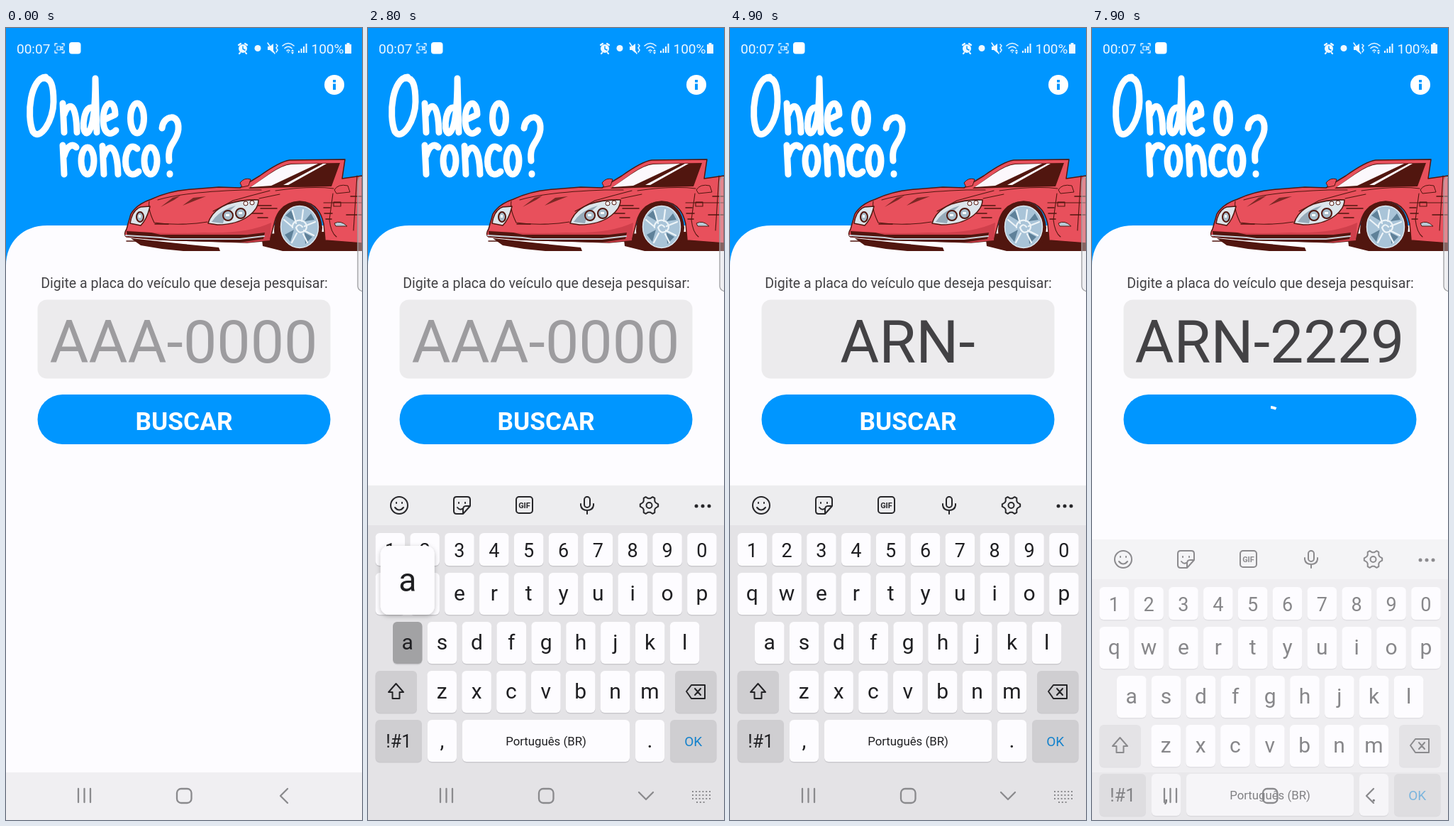
These frames come from a looping animation (502x1115 px, 8 s). An HTML page:

```html
<!DOCTYPE html>
<html lang="pt-BR">
<head>
<meta charset="utf-8">
<title>Busca por placa</title>
<style>
  html, body { margin: 0; width: 100%; height: 100%; overflow: hidden; background: #fdfcff; }
  svg { display: block; width: 100%; height: 100%; font-family: Roboto, sans-serif; }
  .line { fill: none; stroke-linecap: round; stroke-linejoin: round; }
  .mid { text-anchor: middle; }
</style>
</head>
<body>
<svg viewBox="0 0 502 1115">
  <defs>
    <filter id="lift" x="-30%" y="-30%" width="160%" height="160%">
      <feDropShadow dx="0" dy="2" stdDeviation="3" flood-opacity=".25"/>
    </filter>
  </defs>
  <rect width="502" height="1115" fill="#fdfcff"/>
  <path d="M0 0H502V278H58C24 278 0 301 0 335Z" fill="#0096ff"/>

  <g id="status" fill="#eef8ff">
    <text x="15" y="35.5" font-size="19">00:07</text>
    <text x="430.5" y="35.5" font-size="19">100%</text>
    <path class="line" stroke="#eef8ff" stroke-width="1.3" d="M69 25V22H72M79 22H82V25M82 32V35H79M72 35H69V32"/>
    <path id="camera" class="line" stroke="#eef8ff" stroke-width="1.2" d="M72 26H77V31H72ZM77 28L80 26V31L77 29"/>
    <rect x="89" y="20" width="16.5" height="16.5" rx="4" fill="#fff"/>
    <circle cx="334" cy="29" r="6"/>
    <path class="line" stroke="#eef8ff" stroke-width="2.2" d="M328 24L331 22M340 24L337 22M330 35L329 36M338 35L339 36"/>
    <path class="line" stroke="#0096ff" stroke-width="1.4" d="M334 26V29.5L337 31"/>
    <circle cx="355" cy="28.5" r="4.5"/>
    <path d="M369 26H372L377 22V35L372 31H369Z"/>
    <path class="line" stroke="#eef8ff" stroke-width="1.5" d="M369 21L379 36M381 23L383 25L381 28L383 31L381 34"/>
    <path class="line" stroke="#eef8ff" stroke-width="1.6" d="M390 25Q398 18 406 25M393 28.5Q398 24 403 28.5M396 32Q398 30 400 32"/>
    <path d="M397 33H399L398 36ZM404 30L406 33H402ZM402 34H406L404 37Z"/>
    <path d="M412 32h2v3h-2zM415.500 29h2v6h-2zM419 26h2v9h-2zM422.500 22h2v13h-2zM478 23h2.500v-2h4v2h2.500v13h-9z"/>
  </g>

  <g class="line" stroke="#fff" stroke-width="9" role="img" aria-label="Onde o ronco?">
    <path d="M56 69C35 70 28 122 38 146C48 160 67 130 67 104C67 82 64 68 51 71"/>
    <path d="M80 106L82 147M82 122C87 106 99 100 100 147"/>
    <path d="M124 114C111 102 104 147 114 148C122 146 126 116 126 71L128 147"/>
    <path d="M139 129L154 122C154 99 137 101 137 130C138 152 149 151 155 144"/>
    <ellipse cx="185" cy="127" rx="9.5" ry="21"/>
    <path d="M80 165L82 206M82 180C86 166 93 162 99 168"/>
    <ellipse cx="115" cy="187" rx="9" ry="19"/>
    <path d="M136 166L138 206M138 180C144 162 157 162 158 206"/>
    <path d="M185 170C173 159 167 180 169 194C172 210 182 207 187 202"/>
    <ellipse cx="204" cy="187" rx="9" ry="19"/>
    <path d="M220 141C222 122 245 119 243 143C241 162 227 162 230 187M231 205V206"/>
  </g>

  <circle cx="463" cy="80" r="14" fill="#fff"/>
  <path d="M461 73h4v3.500h-4zM461 78.500h4v8.500h-4z" fill="#0096ff"/>

  <g id="car" stroke-linejoin="round">
    <path d="M176 296L250 304L300 309L302 314H250L220 311L190 306ZM360 290L502 285V314H390L362 307Z" fill="#51160f"/>
    <path d="M330 225L358 208Q386 188 400 186L478 185L474 212L502 208V303L450 299L448 276Q442 245 414 244Q386 246 379 272L372 299L340 302L215 298L170 294Q165 291 170 283L176 262Q184 248 205 241Q230 229 262 227L300 224Z" fill="#e8505c" stroke="#51160f" stroke-width="1.5"/>
    <path d="M342 226L366 209Q389 192 402 191L471 190L459 223Q400 224 342 226Z" fill="#51160f"/>
    <path d="M345 224L371 206Q390 193 402 192L440 191L374 222ZM447 191H452L398 221H391Z" fill="#fcf8fc"/>
    <path d="M330 218Q336 210 345 213L342 222L333 224ZM463 228Q468 219 482 222L485 231L466 233Z" fill="#e8505c" stroke="#51160f"/>
    <path d="M170 285Q220 291 280 288Q340 290 374 274L372 299L340 302L215 298L170 294Z" fill="#cf3f4b"/>
    <path d="M170 286L205 288L218 291L340 291L365 288L363 297L330 302L220 299L171 294Z" fill="#51160f"/>
    <path class="line" stroke="#c9d1da" stroke-width="2" d="M169 292L218 295L232 297H330L364 293"/>
    <path class="line" stroke="#51160f" stroke-width="1.1" d="M202 244Q200 256 209 274Q245 279 284 273M214 242Q250 231 334 228L360 228M372 229Q345 236 320 243L292 258M380 229Q430 222 462 226M357 240L386 234M461 233L456 270Q458 288 466 294M495 208L490 285M448 246H502M462 245h10v6h-10z"/>
    <path d="M218 252L235 239L246 236L237 242ZM249 250L264 239L282 237L269 242Z" fill="#7c2825"/>
    <path class="line" stroke="#51160f" stroke-width="1.5" d="M353 250H374M359 254H382M347 261H362M355 267H369M448 253H457M449 261H460M451 269H459M210 276H229M170 300H195M486 237H502M480 263H502"/>
    <path d="M285 275Q290 257 312 248Q333 241 356 242Q356 254 343 264Q326 277 298 277Z" fill="#dce5eb" stroke="#51160f" stroke-width="1.5"/>
    <path d="M290 273Q300 257 324 250L309 263L306 275Z" fill="#97aab9"/>
    <path d="M175 275Q178 256 190 252L203 251Q199 269 190 278Z" fill="#dce5eb" stroke="#51160f" stroke-width="1.5"/>
    <g fill="#a8bdcb" stroke="#51160f" stroke-width="2">
      <circle cx="313" cy="264" r="7"/><circle cx="331" cy="261" r="7"/><ellipse cx="189" cy="266" rx="5" ry="7"/>
    </g>
    <path d="M310 262h5v3h-5zM328 259h5v3h-5zM187 263h3v4h-3z" fill="#fff"/>
    <circle cx="338" cy="247" r="3" fill="#fff" stroke="#51160f"/><circle cx="347" cy="246" r="3" fill="#fff" stroke="#51160f"/>
    <path d="M378 284Q380 245 413 244Q443 246 446 281Q445 311 419 314H394Q378 307 378 284Z" fill="#51160f"/>
    <ellipse cx="414" cy="280" rx="26.5" ry="29.500" fill="#a9c4d8" stroke="#dde8f0" stroke-width="1.500"/>
    <path d="M394 264L402 257L409 273ZM421 272L430 261L435 270ZM406 284L393 291L401 301ZM421 288L432 294L422 304Z" fill="#5f8199"/>
    <path class="line" stroke="#edf4f8" stroke-width="2.200" d="M392 270L404 280M404 257L409 275M419 256L417 272M436 273L421 279M434 292L420 285M410 289L403 302M419 290L425 302M404 281A10 9 0 1 1 422 285Q413 292 409 281Q413 274 418 280"/>
    <path d="M463 275Q472 270 481 279H465Z" fill="#b8cbd7" stroke="#51160f"/>
  </g>
  <path d="M504 210H499Q496 213 496 218V364Q497 370 504 371" fill="#d9d9df66" stroke="#9d9da1" stroke-width="1.3"/>

  <text class="mid" x="251.5" y="366" font-size="19.55" fill="#434245">Digite a placa do veículo que deseja pesquisar:</text>
  <rect x="44.5" y="382.5" width="413" height="111" rx="13" fill="#ecebed"/>
  <text id="plate" class="mid" x="250.5" y="471" font-size="84.3"></text>
  <rect id="cursor" y="382.5" width="3" height="111" fill="#00cdb9"/>
  <rect x="44.5" y="516" width="413" height="70" rx="35" fill="#0096ff"/>
  <text id="search" class="mid" x="251" y="565.5" font-size="35.3" font-weight="700" fill="#fff">BUSCAR</text>
  <path id="spinner" d="M251.5 534A17 17 0 0 1 259 535.800" fill="none" stroke="#fff" stroke-width="4"/>

  <rect y="1048" width="502" height="67" fill="#f0eff2"/>
  <g id="keyboard">
    <rect y="644" width="502" height="600" fill="#e4e3e6"/>
    <rect y="644" width="502" height="56" fill="#ededef"/>
    <g class="line" stroke="#27272a" stroke-width="2">
      <circle cx="44" cy="672" r="12"/>
      <path d="M38 675Q44 682 50 675M40 668V669M48 668V669"/>
      <path d="M125 660H140Q144 660 144 664V673L134 684H125Q121 684 121 680V664Q121 660 125 660M144 673H138Q134 673 134 678V684M126 675Q129 679 133 677M128 668V669M137 668V669"/>
      <rect x="209" y="660" width="23" height="23" rx="4"/>
      <rect x="305" y="660" width="8" height="15" rx="4"/>
      <path d="M300 670V672Q301 679 309 679T318 672V670M309 679V684"/>
      <path id="gear"/>
      <circle cx="396.500" cy="672" r="4"/>
    </g>
    <text class="mid" x="220.5" y="676" font-size="11" font-weight="700" fill="#27272a">GIF</text>
    <g fill="#27272a"><circle cx="463" cy="673" r="2.500"/><circle cx="472" cy="673" r="2.500"/><circle cx="481" cy="673" r="2.500"/></g>
    <g id="keys"></g>
    <g class="line" stroke="#242427" stroke-width="2">
      <path d="M39.500 923L50 935H44.500V944H34.500V935H29Z"/>
      <path d="M449 934L456 925H475V944H456ZM461 930L469 939M469 930L461 939"/>
    </g>
    <path fill="none" stroke="#8a8a8d" stroke-width="2" stroke-dasharray="2 2.8" d="M457 1075H483M457 1080H483M457 1085H483M463 1090H477"/>
  </g>
  <g id="popup">
    <rect x="-38" y="-107" width="76" height="97" rx="12" fill="#fdfcff" filter="url(#lift)"/>
    <text id="popupText" class="mid" y="-43" font-size="46" fill="#1f1f22"></text>
  </g>
  <g class="line" stroke="#8a8a8d" stroke-width="2.3">
    <path d="M102 1071V1090M110.500 1071V1090M119 1071V1090"/>
    <rect x="241" y="1071" width="20.5" height="20" rx="6"/>
    <path id="back"/>
  </g>
</svg>
<script>
const $ = id => document.getElementById(id);
const LOOP = 8000;
const keyMap = {};

function addKey(label, x, y, w, h, { fill = '#fdfcff', size = 30, base = 39, color = '#1f1f22' } = {}) {
  $('keys').insertAdjacentHTML('beforeend', `
    <rect x="${x}" y="${y + 1.5}" width="${w}" height="${h}" rx="6" fill="#cbcace"/>
    <rect x="${x}" y="${y}" width="${w}" height="${h}" rx="6" fill="${fill}"/>
    <text class="mid" x="${x + w / 2}" y="${y + base}" font-size="${size}" fill="${color}">${label}</text>`);
  keyMap[label] = { x: x + w / 2, y, rect: $('keys').lastElementChild.previousElementSibling };
}
function addRow(letters, x, y, h, style) {
  [...letters].forEach((c, i) => addKey(c, x + i * 48.85, y, 41.5, h, style));
}
const gray = '#cfced1';
addRow('1234567890', 10.5, 711, 46, { size: 27, base: 34 });
addRow('qwertyuiop', 10.5, 767, 59);
addRow('asdfghjkl', 35, 836, 59);
addRow('zxcvbnm', 83.5, 905, 59);
addKey('', 10.5, 905, 58.5, 59, { fill: gray });
addKey('', 433, 905, 58.5, 59, { fill: gray });
addKey('!#1', 10.5, 974, 65.5, 59, { fill: gray, size: 25, base: 38.5 });
addKey(',', 84, 974, 41, 59);
addKey('Português (BR)', 133, 974, 236, 59, { size: 16.8, base: 36 });
addKey('.', 377, 974, 41, 59);
addKey('OK', 426, 974, 65.5, 59, { fill: gray, size: 19, base: 37, color: '#1482cc' });

// Six-toothed gear outline
$('gear').setAttribute('d', 'M' + Array.from({ length: 24 }, (_, i) => {
  const a = (i - 0.5) * Math.PI / 12, r = i % 4 < 2 ? 12.8 : 9.8;
  return `${396.5 + r * Math.cos(a)} ${672 + r * Math.sin(a)}`;
}).join('L') + 'Z');

const typed = [[1200, ''], [2900, 'A'], [3700, 'AR'], [4400, 'ARN-'], [5300, 'ARN-2'],
  [5800, 'ARN-22'], [6400, 'ARN-222'], [7000, 'ARN-2229']];
const presses = [[2800, 2900, 'a'], [3500, 3700, 'r'], [4300, 4400, 'n'], [5200, 5300, '2'],
  [5700, 5800, '2'], [6200, 6400, '2'], [6800, 7000, '9']];

const show = (id, on) => $(id).setAttribute('visibility', on ? 'visible' : 'hidden');

function keyboardOffset(t) {
  if (t < 1300) return 600;
  if (t < 1500) return 150 * (1 - (t - 1250) / 250) ** 2;
  return t < 7800 ? 0 : 76 * ((t - 7750) / 150) ** 2;
}

function draw(t) {
  const [since, text] = typed.findLast(([start]) => t >= start) || [Infinity, ''];
  const plate = $('plate');
  plate.textContent = text || 'AAA-0000';
  plate.setAttribute('fill', text ? '#434245' : '#9d9c9f');
  const half = plate.getComputedTextLength() / 2;
  $('cursor').setAttribute('x', text ? 250 + half : 252 - half);
  show('cursor', t >= since && (t - since) % 1000 < 500);

  const offset = keyboardOffset(t);
  $('keyboard').setAttribute('transform', `translate(0 ${offset})`);
  $('keyboard').setAttribute('opacity', Math.max(0, 1 - offset / 160));
  $('back').setAttribute('d', offset ? 'M397 1071L387 1081L397 1091' : 'M382 1076L392 1086L402 1076');

  const press = presses.find(([start, end]) => t >= start && t < end);
  for (const c of 'arn29') keyMap[c].rect.setAttribute('fill', press?.[2] === c ? '#a2a2a4' : '#fdfcff');
  show('popup', press);
  if (press) {
    const { x, y } = keyMap[press[2]];
    $('popup').setAttribute('transform', `translate(${x} ${y})`);
    $('popupText').textContent = press[2];
  }

  const pulse = t % 1000;
  $('camera').setAttribute('opacity', pulse < 300 || pulse >= 800 ? 1 : pulse >= 700 ? 0.5 : 0);
  show('search', t < 7800);
  show('spinner', t >= 7800);
  $('spinner').setAttribute('transform', `rotate(${(t - 7900) * 0.15 + 2} 251 551)`);
}

// The screen advances in steps of 100 ms.
const begin = performance.now();
function tick() {
  draw(Math.floor((performance.now() - begin) % LOOP / 100) * 100);
  requestAnimationFrame(tick);
}
tick();
</script>
</body>
</html>
```
